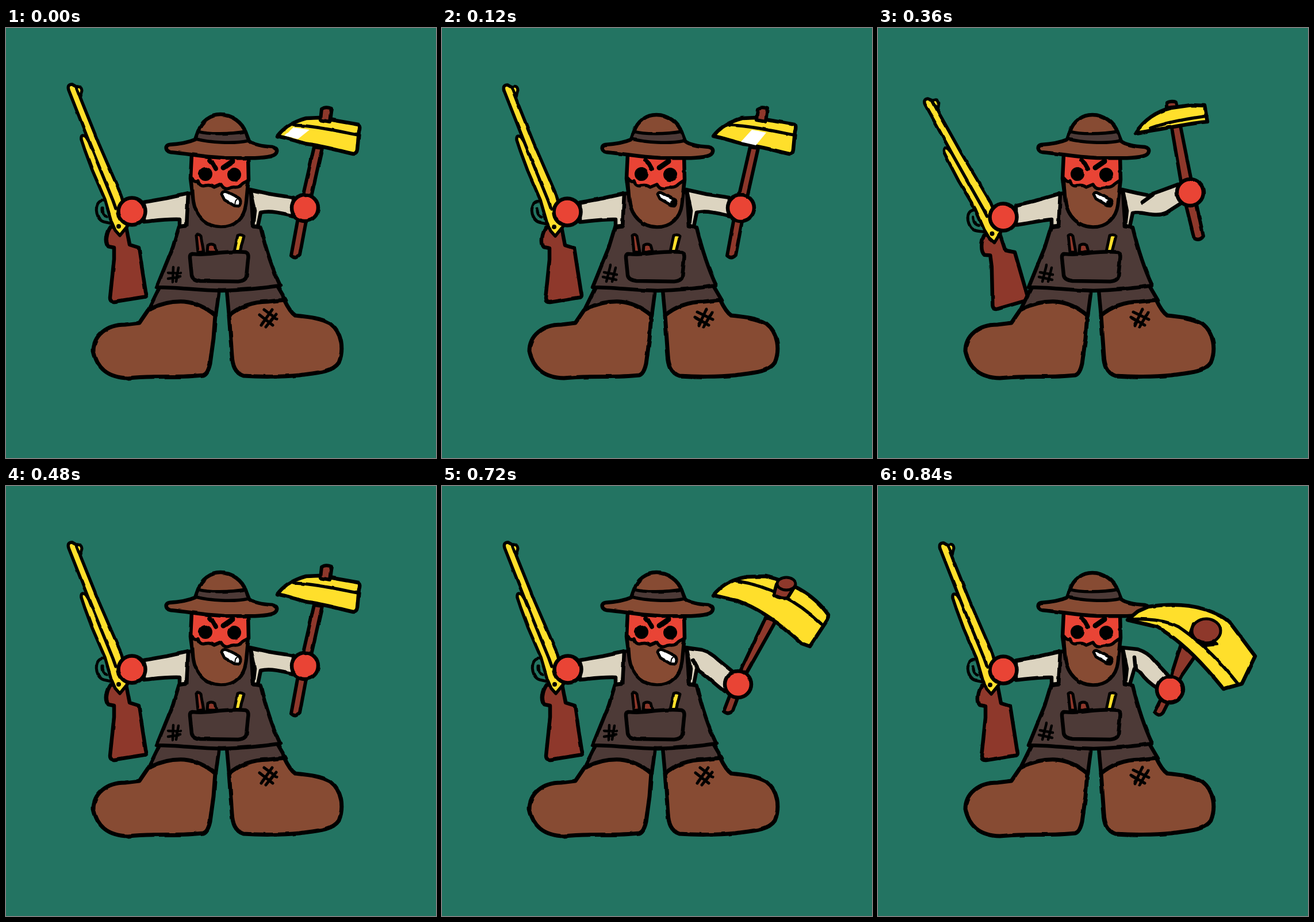
These frames come from a looping animation (748 by 748 pixels, 0.96 s). An HTML page:

```html
<!DOCTYPE html>
<html lang="en">
<head>
<meta charset="utf-8">
<title>Miner</title>
<style>
html, body { margin: 0; width: 100%; height: 100%; overflow: hidden; background: #237462; }
svg { display: block; width: 100%; height: 100%; }
path, circle, ellipse { stroke: #000; stroke-width: 6.5; stroke-linejoin: round; stroke-linecap: round; }
</style>
</head>
<body>
<svg id="stage" viewBox="0 0 748 748"></svg>
<script>
const BROWN = '#874b33', DARK = '#4d3a37', RED = '#e94435', CREAM = '#dcd4c0',
      WOOD = '#8e382b', GOLD = '#ffdf2b', WHITE = '#fff';
const STEP = 120, LOOP = 960;

const shape = (d, fill = 'none', width = 6.5) =>
  `<path d="${d}" fill="${fill}" style="stroke-width:${width}"/>`;
const dot = (x, y, r, fill, width = 6.5) =>
  `<circle cx="${x}" cy="${y}" r="${r}" fill="${fill}" style="stroke-width:${width}"/>`;

// Swing poses: head outline, ridge, knob, handle, hand and sleeve edges
const swing = {
  high: {
    head: 'M472 188C484 172 500 163 522 157L545 156L613 168Q617 171 614 180L611 212Q610 220 604 219C570 211 545 204 525 202C505 197 488 191 472 188Z',
    ridge: 'M499 169C530 169 575 179 612 186',
    knob: 'M549 141Q556 136 566 140L563 163L547 160Z',
    handle: 'M536 207L550 209L525 320L511 395Q504 403 496 396L510 320Z',
    hand: [520, 313],
    sleeve: 'M424 281L460 289L500 295L500 327C480 322 460 317 443 321L438 345'
  },
  upright: {
    head: 'M453 184C465 165 490 144 512 136L540 131L583 131L585 146L590 151L589 178Q589 183 582 182C545 184 490 187 453 184Z',
    ridge: 'M478 156C510 150 555 154 589 151',
    knob: 'M515 117Q522 112 530 116L532 138L518 139Z',
    handle: 'M523 188L536 188L538 300L542 377Q536 385 529 378L526 300Z',
    hand: [531, 297],
    sleeve: 'M424 281L456 287L475 289L510 286L512 316C490 325 465 326 443 322L438 345M459 297Q465 291 476 289'
  },
  back: {
    head: 'M448 183C462 160 485 145 510 139L545 134L568 135L573 163C545 165 490 177 448 183Z',
    ridge: 'M474 174C508 162 545 157 572 153',
    knob: 'M502 139L502 130Q510 126 519 129L521 137Z',
    handle: 'M510 168L525 165L546 270L566 362Q560 371 550 366L530 285Z',
    hand: [543, 286],
    sleeve: 'M424 281L450 287L470 291L495 282L522 272L530 303L502 321C480 331 465 318 443 322L438 345M460 303L478 290'
  },
  lean: {
    head: 'M471 189C486 170 512 157 545 157C585 160 618 174 641 190L641 199L625 246C590 234 550 206 515 201Z',
    ridge: 'M505 165C550 173 600 190 635 212',
    knob: 'M571 149Q580 144 590 151L586 175L568 170Z',
    handle: 'M548 218L561 222L526 330L506 392Q499 399 493 391L511 330Z',
    hand: [518, 329],
    sleeve: 'M424 281L460 289L504 309L498 344C480 335 460 319 443 319L438 345'
  },
  low: {
    head: 'M472 190C484 174 505 162 530 158L562 157C600 164 645 186 672 224L671 232L640 279L626 274C600 250 560 216 515 200Z',
    ridge: 'M512 165C565 173 615 197 660 240',
    knob: 'M582 171L577 189Q588 197 601 195L614 174Z',
    cap: [599, 170, 16, 11],
    handle: 'M563 229L580 236L530 325L506 391Q498 399 490 392L508 345Z',
    hand: [515, 345],
    sleeve: 'M424 281L452 285Q468 290 480 302L507 324L491 357C475 345 458 328 443 319L438 345M437 303L446 320'
  },
  front: {
    head: 'M434 233L452 218L470 210C505 205 540 206 566 214Q600 224 614 240L656 296L633 344L601 353C570 315 530 270 485 245Z',
    ridge: 'M436 232C465 230 500 233 523 245C560 270 595 305 626 344',
    knob: 'M549 240L543 257Q555 274 570 277L589 275Z',
    cap: [571, 252, 25, 21],
    handle: 'M527 276Q542 279 555 291L528 330L496 394Q489 403 481 393L505 345Z',
    hand: [508, 354],
    sleeve: 'M424 281L452 284Q470 290 480 303L505 330L488 353C475 345 465 337 457 325L446 318L438 345M446 298L448 319'
  }
};

const glint = {
  left: 'M500 173L528 177L508 193L484 187Z',
  middle: 'M539 177L564 182L546 204L520 198Z',
  right: 'M562 156L579 154L576 164L556 180L543 180L556 168Z'
};

// [swing, gun hand x, y, gun turn, glint]
const poses = [
  ['high', 219, 319, 0, 'left'],
  ['high', 218, 320, 0, 'middle'],
  ['upright', 217, 327, -4, 'right'],
  ['back', 218, 329, -7.3],
  ['high', 219, 319, 0],
  ['lean', 218, 320, 0],
  ['low', 219, 319, 0],
  ['front', 218, 320, 0]
];

const gunArt =
  shape('M175 301C158 296 154 314 160 328C165 339 174 337 182 340M167 313Q166 325 175 328', 'none', 5) +
  shape('M182 346C175 356 172 373 178 380L188 382L188 402L181 469Q181 477 189 476L239 468Q246 468 243 459L231 382L215 377L209 346Z', WOOD) +
  shape('M122 103Q132 98 133 108L130 119Z', GOLD, 5) +
  shape('M146 200L139 189Q130 183 131 194L137 212L150 247L172 298L183 336L190 352L198 361L211 345L204 305Z', GOLD, 5.5) +
  shape('M191 314L186 300L146 202L109 108Q106 98 115 98L122 102L132 128L161 200L200 290L206 312', GOLD, 5.5) +
  dot(196, 345, 2.5, '#000', 3);

const legs =
  shape('M270 445L370 445L370 462L365 500L247 492Z', DARK) +
  shape('M383 445L470 445L487 474L388 500Z', DARK) +
  shape('M247 491C270 478 290 475 310 476C332 478 350 488 364 500L361 540L355 584Q351 602 343 604C300 609 265 604 212 609C175 608 158 590 152 562C152 535 175 516 207 516L232 513Z', BROWN, 7) +
  shape('M388 500C405 485 430 476 455 476L484 473Q494 494 503 500C530 503 548 505 564 514C585 530 588 560 579 582C568 599 540 600 510 604C480 607 440 607 413 605C398 600 394 586 393 570Z', BROWN, 7);

const apron =
  shape('M316 288L314 344L301 346L290 382L262 451C300 451 330 456 375 457C420 456 450 452 477 448C460 412 451 380 443 347L430 345L426 284Z', DARK) +
  shape('M331 361Q335 357 339 362L344 390L334 390Z', WOOD, 5) +
  shape('M351 378Q357 374 363 378L366 390L350 390Z', WOOD, 5) +
  shape('M403 361Q408 358 414 362L407 389L397 389Z', GOLD, 5) +
  shape('M324 393Q345 395 370 391Q400 388 417 390Q423 392 421 403L418 433Q416 440 404 441L338 440Q324 438 323 430L320 400Q319 394 324 393Z', DARK);

const face =
  shape('M323 220L321 262L326 300C330 329 350 346 374 346C399 346 414 329 417 308L422 264L421 220Z', RED) +
  shape('M323 261Q330 270 334 266Q337 277 347 274Q356 272 362 277L374 272Q379 282 388 279Q393 276 399 277Q407 277 412 271L421 265L417 308C414 329 399 346 374 346C350 346 330 329 326 300Z', BROWN, 5.5) +
  dot(347, 254, 10, '#000', 4) + dot(397, 255, 10, '#000', 4) +
  shape('M354 230L360 236L365 245', 'none', 7.5) +
  shape('M394 232L378 243', 'none', 9);

const hat =
  shape('M329 194L334 180C340 162 355 151 373 151C393 151 411 164 417 182L423 197C432 204 448 206 464 207C475 209 473 220 461 223C440 228 410 226 380 226C340 224 320 219 286 216C276 213 277 204 284 203C300 202 315 200 329 194Z', BROWN) +
  shape('M334 180C350 185 390 185 417 180L422 196C395 202 355 199 330 193Z', DARK, 5.5);

function details(odd) {
  const patches = odd
    ? 'M293 413L286 441M302 417L296 441M282 425L304 429M280 433L303 438'
    : 'M291 416L290 441M300 417L296 441M282 426L304 427M282 436L303 433';
  const mend = odd
    ? 'M460 489L447 517M470 494L455 520M444 494L471 507M440 503L464 517'
    : 'M463 490L444 517M470 497L452 520M441 499L464 517M449 490L471 506';
  const cigar = odd
    ? shape('M375 289Q378 284 385 288L405 299Q409 304 404 309L398 308L379 297Z', WHITE, 5) +
      dot(402, 304, 3, '#000', 4)
    : shape('M375 289Q377 282 386 286L404 295Q411 302 406 310L397 309L380 299Z', WHITE, 5) +
      shape('M403 297Q397 301 399 308', 'none', 2);
  return shape(patches, 'none', 4.5) + shape(mend, 'none', 5) + cigar;
}

function leftSleeve(y) {
  const drop = (y - 319) * .55;
  return shape(`M240 ${303 + drop}L280 ${296 + drop / 2}L317 288L314 344L302 345L302 333C280 ${332 + drop / 2} 260 ${335 + drop} 240 ${337 + drop}Z`, CREAM);
}

function rightSleeve(edge) {
  return shape(edge, CREAM, 0) + shape('M426 284L433 318L431 345L439 345L444 317Z', CREAM, 0) +
    shape('M426 284L433 318L430 345L438 345') + shape(edge);
}

function hammer(p, shine) {
  let art = shape(p.handle, WOOD, 6) + shape(p.head, GOLD, 6.5);
  if (shine) art += shape(glint[shine], WHITE, 0);
  art += shape(p.ridge, 'none', 5.5) + shape(p.knob, WOOD, 6);
  if (p.cap) {
    const [x, y, rx, ry] = p.cap;
    art += `<ellipse cx="${x}" cy="${y}" rx="${rx}" ry="${ry}" fill="${WOOD}" style="stroke-width:5"/>`;
  }
  return art;
}

// The opaque noise keeps the hand-drawn wobble centred
function ink(seed) {
  return `<filter id="ink" filterUnits="userSpaceOnUse" x="0" y="0" width="748" height="748" color-interpolation-filters="sRGB">
    <feTurbulence type="fractalNoise" baseFrequency=".05" seed="${seed}"/>
    <feColorMatrix values="1 0 0 0 0  0 1 0 0 0  0 0 1 0 0  0 0 0 0 1" result="noise"/>
    <feDisplacementMap in="SourceGraphic" in2="noise" scale="3" xChannelSelector="R" yChannelSelector="G"/>
  </filter>`;
}

function draw(step) {
  const [name, x, y, turn, shine] = poses[step], odd = step % 2, p = swing[name];
  return ink(3 + odd) + '<g filter="url(#ink)">' +
    `<g transform="translate(${x} ${y}) rotate(${turn}) translate(-219 -319)">${gunArt}</g>` +
    legs + apron + leftSleeve(y) + rightSleeve(p.sleeve) + face + hat + details(odd) +
    dot(x, y, 23.5, RED) + hammer(p, shine) + dot(...p.hand, 23, RED) + '</g>';
}

const stage = document.getElementById('stage'), start = performance.now();
let shown = -1;

function tick() {
  const step = Math.floor((performance.now() - start) % LOOP / STEP);
  if (step !== shown) {
    stage.innerHTML = draw(step);
    shown = step;
  }
  requestAnimationFrame(tick);
}
tick();
</script>
</body>
</html>
```
